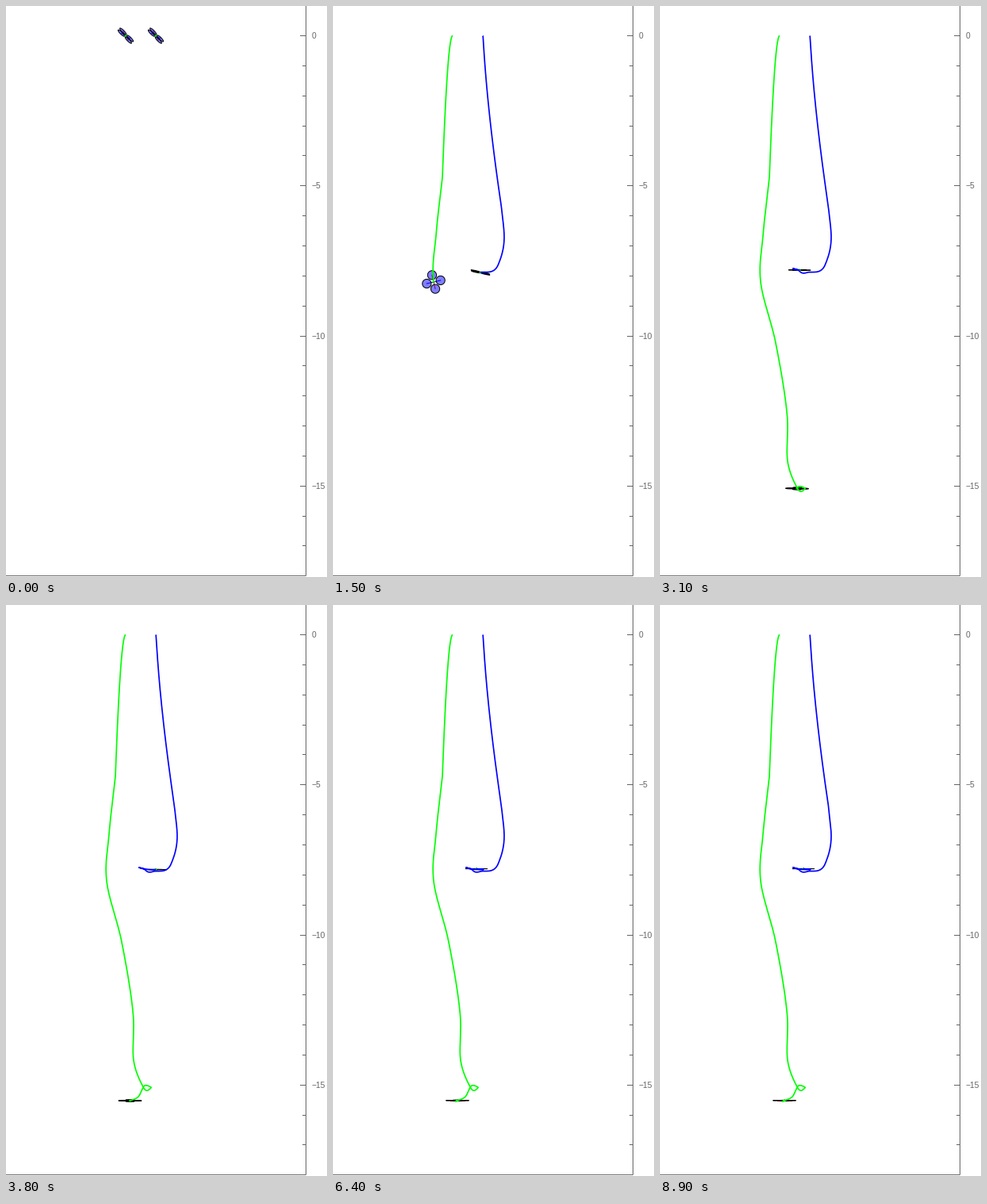
Recreate the animation shown at these times as a matplotlib script. Size 405x720 px, loop 9 s.

```python
import numpy as np
import matplotlib.pyplot as plt
from matplotlib.animation import FuncAnimation

W, H, DPI = 405, 720, 72          # at 72 dpi one point is one pixel
FRAMES, STEP = 90, 100
UNIT, ZERO_Y, AXIS_X, FLOOR_Y = 37.85, 37.5, 378.5, 718.5
GRAY = "#666666"
ARM, ROTOR = 8.9, 5.6
CIRCLE = np.linspace(0, 2 * np.pi, 41)


def hermite(keys, t):
    """Smooth curve through (time, x, y) keys that comes to rest at the last."""
    kt, kv = keys[:, 0], keys[:, 1:]
    slope = np.gradient(kv, kt, axis=0)
    slope[-1] = 0
    t = np.minimum(t, kt[-1])
    i = np.clip(np.searchsorted(kt, t, side="right") - 1, 0, len(kt) - 2)
    h = (kt[i + 1] - kt[i])[:, None]
    u = (t - kt[i])[:, None] / h
    return ((1 + 2 * u) * (1 - u) ** 2 * kv[i] + u * (1 - u) ** 2 * h * slope[i]
            + u * u * (3 - 2 * u) * kv[i + 1] + u * u * (u - 1) * h * slope[i + 1])


def flight(fall, t_catch, waypoints):
    """Ballistic fall until t_catch, then a guided path through waypoints."""
    keys = np.array([(t_catch, *fall(t_catch)), *waypoints])

    def path(t):
        t = np.atleast_1d(t)
        return np.where((t < t_catch)[:, None], np.c_[fall(t)], hermite(keys, t))
    return path


def settle(t):
    return 1 / (1 + np.exp(3.5 * (t - 2)))


green_path = flight(
    lambda t: (151 - 13.2 * t, ZERO_Y + 185.5 * t ** 2), .98,
    [(1.25, 130.3, 286), (1.5, 127, 348), (1.75, 146, 425), (2, 160.5, 517),
     (2.2, 161, 574), (2.4, 173.5, 608.5), (2.65, 183, 608.8), (3, 175, 606),
     (3.4, 167, 620), (3.8, 156.5, 625), (4.6, 157, 624.8)])
blue_path = flight(
    lambda t: (189 + 3 * t + 20.5 * t ** 3, ZERO_Y + 216 * t ** 2), 1,
    [(1.1, 216, 291), (1.25, 208.5, 326), (1.5, 186, 336), (1.9, 174, 333),
     (2.6, 168, 331), (3.2, 178, 333.3), (3.8, 189, 333.6), (5, 181, 332.6)])


# Attitude: roll (deg), openness of the rotor plane, yaw (deg)
def green_pose(t):
    openness = .25 * np.exp(-t / 4) + .83 * np.exp(-((t - 1.5) / .4) ** 2)
    return 45 * settle(t), openness, 45 * settle(t)


def blue_pose(t):
    roll = 45 * np.exp(-(t / 1.5) ** 2) * np.cos(2 * np.pi * t / 1.7)
    return roll, .25 * np.exp(-t / 1.5), 20 + 25 * settle(t)


fig = plt.figure(figsize=(W / DPI, H / DPI), dpi=DPI, facecolor="white")
ax = fig.add_axes([0, 0, 1, 1])
ax.set(xlim=(0, W), ylim=(H, 0))
ax.axis("off")


def draw_axis():
    def rule(xs, ys):
        ax.plot(xs, ys, color=GRAY, lw=1, snap=False, solid_capstyle="butt")

    rule([AXIS_X, AXIS_X], [0, FLOOR_Y])
    rule([0, AXIS_X], [FLOOR_Y, FLOOR_Y])
    for n in range(18):
        y = np.floor(ZERO_Y + n * UNIT) + .5
        major = n % 5 == 0
        rule([AXIS_X - (7.5 if major else 4.5), AXIS_X], [y, y])
        if major:
            ax.text(386, y + 3.5, f"\u2212{n}" if n else "0", size=10.3,
                    color=GRAY, family="Liberation Sans", va="baseline")


class Drone:
    def __init__(self, path, pose, color):
        self.path, self.pose = path, pose
        self.arms = [ax.plot([], [], color=c, lw=1, zorder=3)[0]
                     for c in ("red", "blue")]
        self.rotors = [ax.fill([0], [0], fc=(0, 0, 1, .5), ec="black", lw=1,
                               zorder=4)[0] for _ in range(4)]
        self.body = ax.fill([0], [0], fc="#00c800", ec="none", zorder=5)[0]
        self.trail, = ax.plot([], [], color=color, lw=1.7, zorder=6,
                              solid_capstyle="butt")

    def update(self, t):
        center = self.path(t)[0]
        roll, openness, yaw = self.pose(t)
        roll, yaw = np.radians(roll), np.radians(yaw)
        major = np.array([np.cos(roll), np.sin(roll)])
        minor = openness * np.array([-np.sin(roll), np.cos(roll)])

        def project(radius, angle):
            return radius * (np.outer(np.cos(angle), major)
                             + np.outer(np.sin(angle), minor))

        hubs = center + project(ARM, yaw + np.arange(4) * np.pi / 2)
        for arm, ends in zip(self.arms, (hubs[::2], hubs[1::2])):
            arm.set_data(*ends.T)
        for rotor, hub in zip(self.rotors, hubs):
            rotor.set_xy(hub + project(ROTOR, CIRCLE))
        self.body.set_xy(center + 1.5 * np.c_[np.cos(CIRCLE), np.sin(CIRCLE)])
        ts = np.linspace(0, t, int(t * 60) + 2) if t else np.empty(0)
        self.trail.set_data(*self.path(ts).T)


draw_axis()
drones = [Drone(green_path, green_pose, "#00ff00"),
          Drone(blue_path, blue_pose, "#0000ff")]


def update(k):
    for drone in drones:
        drone.update(k * STEP / 1000)
    return []


anim = FuncAnimation(fig, update, frames=FRAMES, interval=STEP,
                     init_func=lambda: update(0), repeat=True, repeat_delay=0)
plt.show()
```
